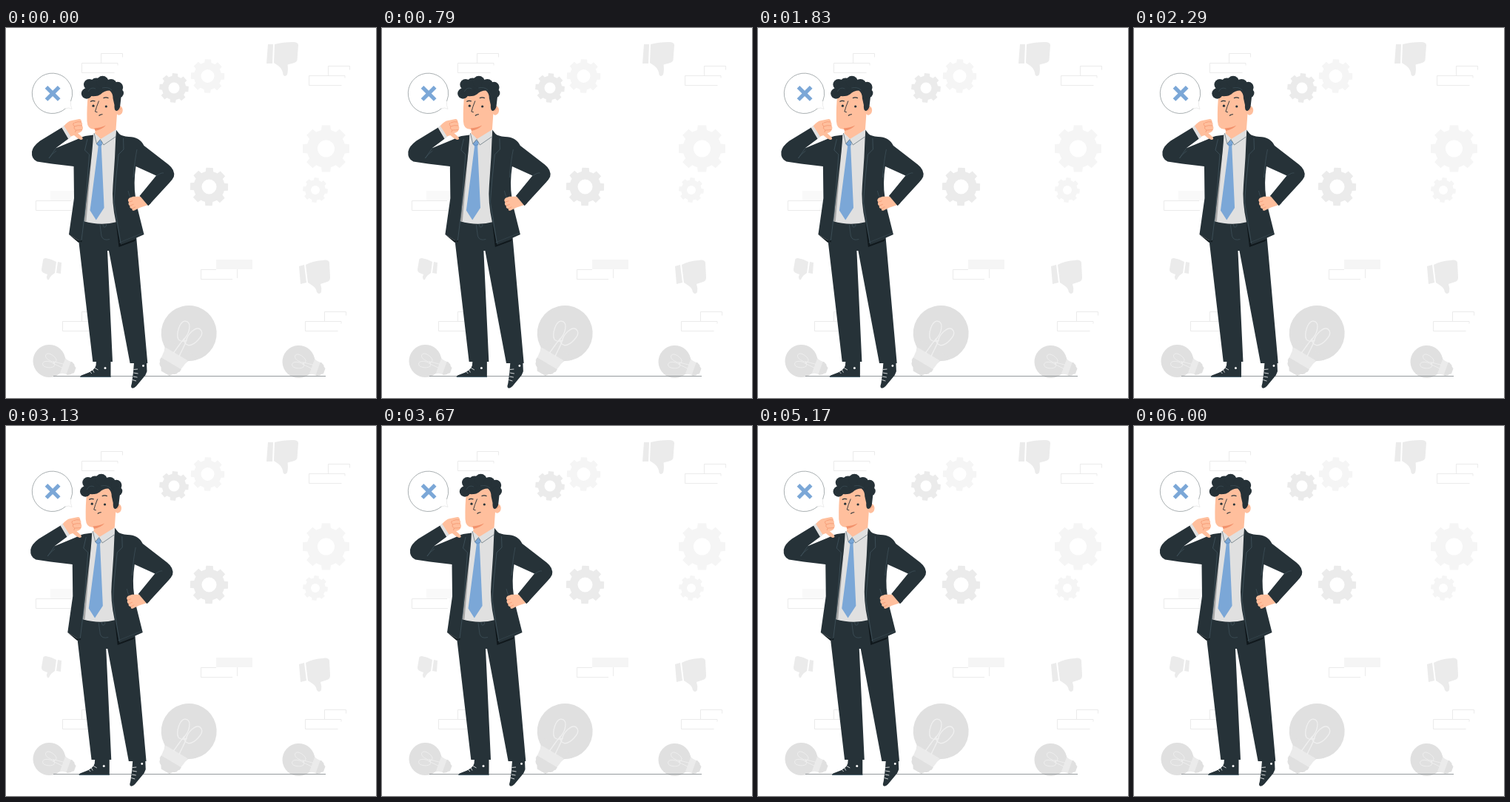
Recreate the animation shown at these times as an HTML page with a canvas. Size 500 px wide and 500 px high, loop 6.04 s.

```html
<!DOCTYPE html>
<html lang="en">
<head>
<meta charset="utf-8">
<title>Disapproval</title>
<style>
  html, body { margin: 0; width: 100%; height: 100%; overflow: hidden; background: #fff; }
  canvas { display: block; width: 500px; height: 500px; }
</style>
</head>
<body>
<canvas id="stage"></canvas>
<script>
const SIZE = 500, LOOP = 6040;
const DARK = '#263238', SEAM = '#455a64', SKIN = '#ffbf9d', BLUSH = '#f2916b', BLUE = '#7ba7d7';
const SHIRT = '#e0e0e0', GREY = '#ebebeb', PALE = '#f5f5f5', HAIRLINE = '#e6e6e6';
// horizontal shake, one stop every tenth of the loop
const STOPS = [0, -1, 2, -4, 4, -4, 4, -4, 2, -1, 0];

const canvas = document.getElementById('stage');
const ctx = canvas.getContext('2d');
const ratio = window.devicePixelRatio || 1;
canvas.width = canvas.height = SIZE * ratio;

function fill(d, color) {
  ctx.fillStyle = color;
  ctx.fill(new Path2D(d), 'evenodd');
}

function line(d, color, width = 0.6) {
  ctx.strokeStyle = color;
  ctx.lineWidth = width;
  ctx.stroke(new Path2D(d));
}

function dot(x, y, r, color) {
  ctx.fillStyle = color;
  ctx.beginPath();
  ctx.arc(x, y, r, 0, Math.PI * 2);
  ctx.fill();
}

function gear(x, y, r, hole, turn, color) {
  const step = Math.PI / 4, root = 0.81;
  ctx.beginPath();
  for (let i = 0; i < 8; i++) {
    const a = turn + i * step;
    for (const [off, k] of [[-0.25, root], [-0.18, 1], [0.18, 1], [0.25, root]]) {
      ctx.lineTo(x + Math.cos(a + off) * r * k, y + Math.sin(a + off) * r * k);
    }
    ctx.arc(x, y, r * root, a + 0.25, a + step - 0.25);
  }
  ctx.closePath();
  ctx.moveTo(x + hole, y);
  ctx.arc(x, y, hole, 0, Math.PI * 2);
  ctx.fillStyle = color;
  ctx.fill('evenodd');
}

// a bulb of radius 1 with its base along +x
function bulb(x, y, r, degrees) {
  ctx.save();
  ctx.translate(x, y);
  ctx.rotate(degrees * Math.PI / 180);
  ctx.scale(r, r);
  dot(0, 0, 1, '#e0e0e0');
  fill('M.6 -.72Q.8 -.5 1 -.44V.44Q.8 .5 .6 .72Z', '#e0e0e0');
  fill('M.87 -.46L1.28 -.41V.41L.87 .46Z', GREY);
  fill('M1.26 -.42H1.36Q1.42 -.36 1.48 -.36Q1.54 -.32 1.56 -.25L1.68 -.17V.17L1.56 .25Q1.54 .32 1.48 .36Q1.42 .36 1.36 .42H1.26Z', '#e0e0e0');
  for (const side of [1, -1]) {
    ctx.save();
    ctx.scale(1, side);
    line('M.9 .12C.6 .08 .4 .1 .2 .03C0 0 -.45 .1 -.3 .35C-.2 .5 .25 .4 .38 .22C.42 .1 .35 0 .25 -.06', '#f0f0f0', 0.035);
    ctx.restore();
  }
  ctx.restore();
}

function bricks(x, y) {
  line(`M${x + 26} ${y + 13}V${y}H${x + 55}V${y + 5}` +
       `M${x + 44} ${y + 26}H${x}V${y + 13}H${x + 48.5}V${y + 16}`, HAIRLINE, 0.8);
}

function backdrop() {
  bricks(102.5, 34.5);
  bricks(409.5, 51.5);
  bricks(404.5, 383.5);
  bricks(76.5, 383.5);
  fill('M60 220H109V233H60Z', '#f9f9f9');
  line('M88 233.5H40.5V246.5H89', HAIRLINE, 0.8);
  fill('M284 313H333V326H284Z', PALE);
  line('M284 326.5H263.5V339.5H306M312.5 326V338', HAIRLINE, 0.8);

  gear(227, 81, 20, 7.5, 0.08, GREY);
  gear(272.5, 65, 23, 9, 0.02, PALE);
  gear(274.5, 214.5, 26, 10, 0.02, GREY);
  gear(432.5, 163, 32, 11.5, 0, PALE);
  gear(418, 219, 17, 6, 0.1, PALE);

  fill('M354 22H361L360 48H352ZM363 22Q374 19 388 19Q394.500 19 395 23L393.500 43Q393 46 388 47.500L380.500 49.500Q381.500 58 380 63Q376.500 67 374.500 63Q374 56 368 51L362 47Z', GREY);
  fill('M396 322L403 320L406 344L398 346ZM405 320Q414 315 427 314Q436 312 437 317L438 337Q438 342 434 343L425 346Q427 352 426 357Q423 361 420 357Q419 351 414 348L408 344Z', GREY);
  fill('M70 316L75 317L74 332L68 331ZM68 316Q61 312 54 311Q50 311 50 314L48 326Q48 330 51 331L56 333Q54 337 56 340Q58 341 59 338Q60 335 66 331Z', GREY);

  bulb(247.2, 412.5, 37.5, 120.5);
  bulb(58.5, 450, 22, 20);
  bulb(395.5, 451, 22, 20);
  line('M64 470.5H432', '#8a8f92', 0.9);

  dot(62.5, 88.3, 27, '#fff');
  fill('M76 108Q84 106 90 110Q87 105 87 99Z', '#fff');
  ctx.beginPath();
  ctx.arc(62.5, 88.3, 27.2, 0.85, 0.4 + Math.PI * 2);
  ctx.strokeStyle = '#70797d';
  ctx.lineWidth = 0.6;
  ctx.stroke();
  line('M80.5 108.7Q85 107 89 109.5Q86.6 104 87.5 99', '#e0e0e0', 0.6);
  line('M54.500 79.800L71.700 97M71.700 79.800L54.500 97', BLUE, 5.2);
}

function legs() {
  fill('M122 450H141.500V472H100.500Q100 470 103 469L112 465.500Q120 461.500 121.500 456Z', DARK);
  line('M100.500 471.500H141.500', '#546e7a', 0.9);
  line('M112.500 463.500L116 467M116.500 461L119 465.500M120 459.500L124.500 462', '#fff', 0.8);
  dot(134, 459.5, 1.5, '#fff');

  fill('M173 452H190L190.500 464Q189 469 186 472L176 484Q172 488 169.500 486Q168.500 484 170 480L172 465Z', DARK);
  line('M171 475.500L176 477M172 471L177.500 472M172.500 466L178.500 467M172.500 461.500L178 461', '#fff', 0.8);
  dot(185.5, 456.5, 1.4, '#fff');

  fill('M97.300 280L117.300 451H144L137 301H139L167.600 453H191.300L175 270L150 255L104 255Z', DARK);
  line('M127 266L129 281Q131 288 140 285.500M131 265Q131 270 134 269Q136 268 135.500 265', SEAM, 0.6);
}

function torso() {
  fill('M118 143L149 138L150 262Q128 268 105 261Z', SHIRT);
  fill('M117 150L114 195L108.500 261L104 261L110 180Z', '#a6a6a6');
  fill('M126.500 151L130.500 154L128.800 160L132.600 243L121.800 259.500L113.500 246.500L124.700 160L122 156Z', BLUE);
  line('M122.500 157Q126.500 160 130 157', '#5b86b5', 0.7);

  // raised arm and left panel
  fill('M75.500 134.500L84.500 149.500L67 162.500L96 150.500Q101 147 107 146L118 144.500Q117 165 113 195Q108 240 105 263L102 289.500L85 279L92 230L91.500 187L62 183.500L42 180.500Q34 177 35 167Q36 160 46 152.500Z', DARK);
  fill('M85 279L102 289.500L103 286L98 290Z', '#111a1e');
  // right panel and arm on hip
  fill('M148.700 137.500L153 143Q156 146 166 147Q180.500 147 186.500 159L219.500 184.500Q229 192 226.800 201Q225 205 221 209L192.500 240L180.500 227L203 199.500L175.500 187Q172 210 175 229L178 245L186.500 279L155 293L148.500 262Q142.500 235 144.500 213Q147.500 175 148.700 137.500Z', DARK);
  fill('M148.500 262L155 293L176 285L174 288L152.500 296Z', '#10181c');

  line('M110 150L106.500 165L112.500 171L106.500 250L102 287M158.500 149L159 164L152 171Q148 205 146 235L155 291', SEAM, 0.7);
  line('M177 164Q174 178 172 202M67 163L58 176Q62 170 68 166M165 220Q166 227 170 231M203 200Q210 195 213 196', SEAM, 0.6);
  line('M153 290L185 277', SEAM, 0.4);
}

function hands() {
  fill('M75.300 134.500L79 131L88.500 146.500L84.300 150Z', SHIRT);
  fill('M78.500 132.500Q83 126 89 125L99 123Q102 123 102 127Q104 129 103 132Q105 135 103 138Q102 141 97 142L103 147.500Q105 151 101 151Q96 149 92 145L87.500 146.500Z', SKIN);
  line('M92.500 128Q97 126 102 127M92.500 133Q97 131 103 132M94.500 138Q99 138 103 137.500M91.500 128Q89.500 131 92.500 133Q90.500 136 94.500 138L93.500 141', BLUSH, 0.7);

  ctx.save();
  ctx.translate(1, 0.7);
  fill('M184 227L190.500 238.500L180 242L172 246Q169 246.500 169.500 243.500Q165.500 243 166.500 239.500Q163.500 238 165 234.500Q162.500 232 165.500 229L171 227Z', SKIN);
  line('M165 234.500L170 233M166.500 239.500L171.500 237.500M169.500 243.500L174 241', BLUSH, 0.7);
  ctx.restore();
  fill('M181 227L184 224L196 236.500L192 240Z', DARK);
}

function head() {
  fill('M111 90Q109 106 109.500 126Q110 138 121 137L120 142.500Q126 147 128 150Q138 147 148.500 137.500L150 116L149 80H120Z', SKIN);
  fill('M119.500 135.500Q128 135 135 131.500Q130 137 120.500 139Z', BLUSH);
  fill('M119 142L127.500 150L122.500 156.500L118 147ZM149 137L128 150L132 158L148 147Z', SHIRT);
  line('M119 142L122.500 156.500L127.500 150.500L132 158L148 147', SEAM, 0.6);

  ctx.fillStyle = SKIN;
  ctx.beginPath();
  ctx.ellipse(153, 111.5, 4.7, 6.2, 0.15, 0, Math.PI * 2);
  ctx.fill();
  line('M152 112Q154 108 156 109', BLUSH, 0.7);

  fill('M108 86L115 70L140 72L154 86L155.500 94L154 107Q152 112 149 112Q146 111 146.500 104L144.500 95Q144.500 88 140 84.500Q133 84.500 128 89.500Q121 94 117 90.500L112 95Z', DARK);
  for (const [x, y, r] of [[109, 88.5, 7.2], [112.5, 76.5, 7.5], [122, 76, 8.5], [130.5, 73, 8.2],
                           [142, 76.8, 7.8], [151, 80, 7.2], [152.5, 88, 6.5], [118, 86, 6.3]]) {
    dot(x, y, r, DARK);
  }
  line('M111 86Q114 79 121 82M130 81Q138 79 143 84', SEAM, 0.5);

  line('M114 99.500Q117 97.500 120.500 99M131.500 94.800Q135 92.800 138.500 94.800', DARK, 1.2);
  dot(118, 105.2, 1.6, DARK);
  dot(135.3, 106, 1.6, DARK);
  line('M125.500 98.500Q122 107 120.500 113L123.500 113.800', DARK, 0.9);
  line('M125.500 118.500Q128 116.300 130.500 116.800', DARK, 1.1);
}

// the standard CSS "ease-out" curve
function easeOut(x) {
  let lo = 0, hi = 1;
  for (let i = 0; i < 24; i++) {
    const t = (lo + hi) / 2;
    if (1.74 * t * t * (1 - t) + t ** 3 < x) lo = t; else hi = t;
  }
  return lo * lo * (3 - 2 * lo);
}

function shake(ms) {
  const p = (ms % LOOP) / LOOP * 10;
  const i = Math.floor(p);
  return STOPS[i] + (STOPS[i + 1] - STOPS[i]) * easeOut(p - i);
}

function draw(ms) {
  ctx.setTransform(ratio, 0, 0, ratio, 0, 0);
  ctx.fillStyle = '#fff';
  ctx.fillRect(0, 0, SIZE, SIZE);
  backdrop();
  ctx.translate(shake(ms), 0);
  legs();
  torso();
  hands();
  head();
}

let start;
function tick(now) {
  if (start === undefined) start = now;
  draw(Math.max(0, now - start));
  requestAnimationFrame(tick);
}
draw(0);
requestAnimationFrame(tick);
</script>
</body>
</html>
```
